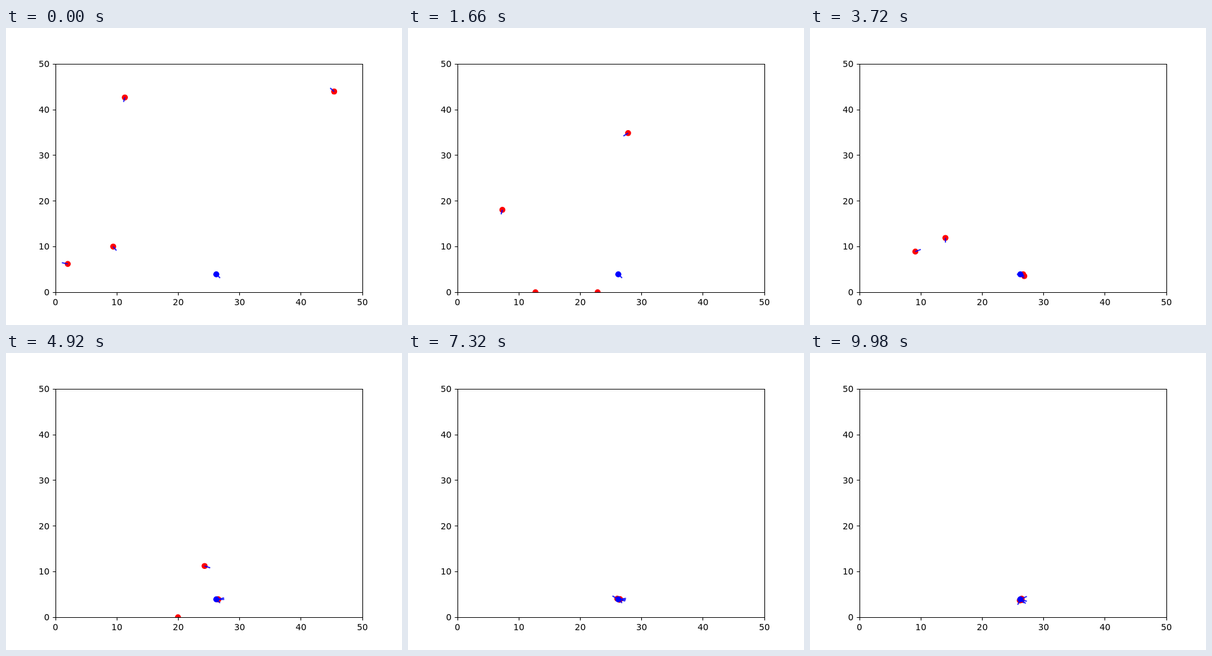
An HTML page for the animation above (10000 ms loop, 640x480 px).

```html
<!DOCTYPE html>
<html>
<head>
<meta charset="utf-8">
<style>
html, body { margin: 0; width: 100%; height: 100%; overflow: hidden; background: #fff; }
svg { display: block; width: 640px; height: 480px; }
text { font: 13.89px "DejaVu Sans", sans-serif; }
</style>
</head>
<body>
<svg viewBox="0 0 640 480">
  <clipPath id="area"><rect x="80" y="57.6" width="496" height="369.6"/></clipPath>
  <g id="plot" clip-path="url(#area)"></g>
  <g id="axes" fill="none" stroke="#000" stroke-width="1.11"></g>
</svg>
<script>
const NS = 'http://www.w3.org/2000/svg';
const STEP = 20, STEPS = 500;
const GOAL = { x: 26.2, y: 3.93, h: -52 };

// way: step, x, y, heading in degrees; end: heading at the last step
const ROBOTS = [
  { end: 1418, way: [
    [0, 45.4, 43.9, 130], [46, 36.9, 39.9, 205], [120, 20.4, 27.7, 235],
    [186, 14, 11.9, 270], [228, 15.8, 0, 305], [256, 22.2, 0, 316],
    [284, 27.6, 0, 375], [311, 29.5, 4.2, 475], [330, 26.8, 4, 545]] },
  { end: 610, way: [
    [0, 11.3, 42.6, 258], [143, 4.3, .3, 258], [153, 4.9, .2, 425],
    [186, 9.1, 8.9, 388], [206, 14, 11.5, 358], [256, 26.6, 10.3, 330],
    [290, 27.5, 5, 230], [311, 26.2, 3.7, 237]] },
  { end: 1111, way: [
    [0, 9.4, 10, -58], [39, 15.2, 0, -58], [74, 21.2, 0, -45],
    [100, 26.5, .6, 20], [120, 28, 3.4, 93], [140, 27, 4.2, 160],
    [186, 26.65, 3.95, 180]] },
  { end: 1755, way: [
    [0, 2, 6.2, 163], [12, 1.4, 5.2, 250], [46, 5.2, 1.5, 310],
    [54, 6.9, 0, 312], [120, 20.5, 0, 314], [150, 26.4, .4, 380],
    [166, 28.2, 2.6, 440], [186, 26.85, 3.55, 500]] }
];

const px = x => 80 + x * 9.92;
const py = y => 427.2 - y * 7.392;
const cos = d => Math.cos(d * Math.PI / 180);
const sin = d => Math.sin(d * Math.PI / 180);

function add(parent, tag, attrs) {
  const el = document.createElementNS(NS, tag);
  for (const k in attrs) el.setAttribute(k, attrs[k]);
  return document.getElementById(parent).appendChild(el);
}

function hermite(p, q, vp, vq, u) {
  const u2 = u * u, u3 = u2 * u;
  return p * (2 * u3 - 3 * u2 + 1) + q * (3 * u2 - 2 * u3) +
    vp * (u3 - 2 * u2 + u) + vq * (u3 - u2);
}

function travel([s0, x0, y0, h0], [s1, x1, y1, h1], step) {
  const u = (step - s0) / (s1 - s0);
  const d = Math.hypot(x1 - x0, y1 - y0);
  const x = hermite(x0, x1, d * cos(h0), d * cos(h1), u);
  const y = y0 || y1 ? hermite(y0, y1, d * sin(h0), d * sin(h1), u) : 0;
  return { x, y: Math.max(0, y), h: h0 + (h1 - h0) * u };
}

// close to the goal a robot turns and sways around it
function settle([s, x, y, h0], end, step) {
  const n = step - s, fade = Math.exp(-n / 40);
  const h = h0 + (end - h0) * n / (STEPS - 1 - s);
  const r = -.25 * Math.cos(n / 20) * (1 - fade);
  return {
    x: GOAL.x + (x - GOAL.x) * fade + r * cos(h),
    y: GOAL.y + (y - GOAL.y) * fade + r * sin(h),
    h
  };
}

function pose({ way, end }, step) {
  const i = way.findIndex(k => k[0] > step);
  return i < 0 ? settle(way[way.length - 1], end, step) : travel(way[i - 1], way[i], step);
}

const makeDot = fill => add('plot', 'circle', { r: 4.86, fill });
const makeRay = () => add('plot', 'line', {
  stroke: '#00f', 'stroke-width': 2, 'stroke-opacity': .85
});

const dots = ROBOTS.map(() => makeDot('#f00'));
const goalDot = makeDot('#00f');
const rays = ROBOTS.map(makeRay);
const goalRay = makeRay();

function place(dot, ray, { x, y, h }) {
  const set = (el, k, v) => el.setAttribute(k, v.toFixed(2));
  set(dot, 'cx', px(x));
  set(dot, 'cy', py(y));
  set(ray, 'x1', px(x));
  set(ray, 'y1', py(y));
  set(ray, 'x2', px(x + cos(h)));
  set(ray, 'y2', py(y + sin(h)));
}

function label(x, y, anchor, value) {
  add('axes', 'text', { x, y, 'text-anchor': anchor, fill: '#000', stroke: 'none' })
    .textContent = value;
}

add('axes', 'path', { d: 'M80.5 58.5H576.5V427.5H80.5Z' });
for (let v = 0; v <= 50; v += 10) {
  const x = Math.floor(px(v)) + .5, y = Math.round(py(v)) + .5;
  add('axes', 'path', { d: `M${x} 427.5v4.86M80.5 ${y}h-4.86` });
  label(px(v), 448, 'middle', v);
  label(70.3, py(v) + 5.2, 'end', v);
}
place(goalDot, goalRay, GOAL);

function draw(ms) {
  const step = Math.floor(ms / STEP) % STEPS;
  ROBOTS.forEach((robot, i) => place(dots[i], rays[i], pose(robot, step)));
}

let start;
function tick(now) {
  if (start === undefined) start = now;
  draw(Math.max(0, now - start));
  requestAnimationFrame(tick);
}
draw(0);
requestAnimationFrame(tick);
</script>
</body>
</html>
```
